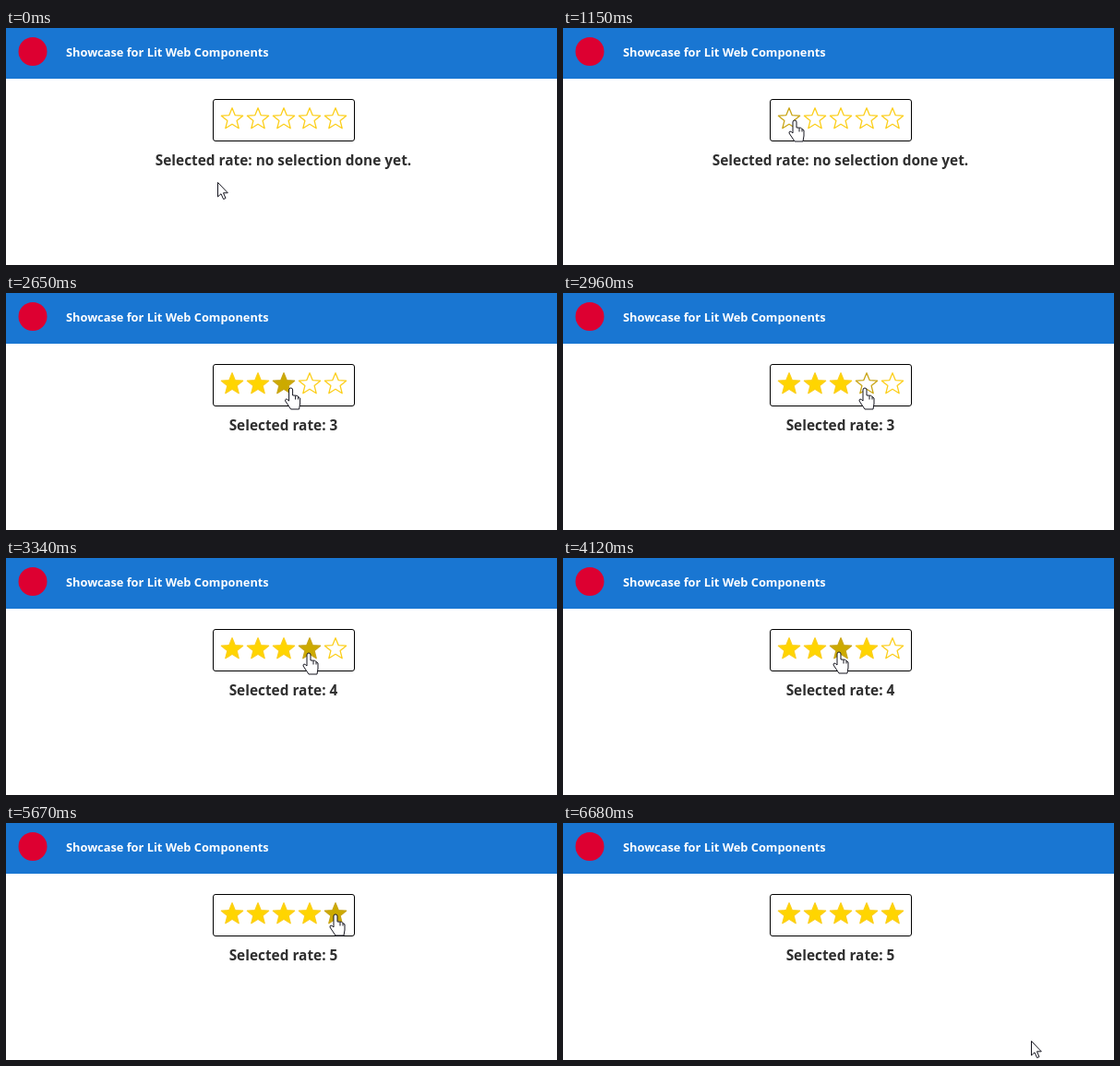
An HTML page that plays this animation: 597 px wide and 257 px high, repeating every 6.85 s.

```html
<!DOCTYPE html>
<html lang="en">
<head>
<meta charset="utf-8">
<title>Star rating</title>
<style>
  html, body { margin: 0; height: 100%; overflow: hidden; background: #fff; }
  svg { display: block; width: 597px; height: 257px; font: 700 15.4px "Open Sans", "Noto Sans", sans-serif; }
  .title { font-size: 12.8px; fill: #fff; }
  #label { fill: #2f2f2f; text-anchor: middle; }
  #stars { stroke: #fccf1c; stroke-width: 1.3; stroke-linejoin: round; }
  .hover { filter: brightness(.8); }
  #cursor { fill: #fff; stroke: #15151f; stroke-linejoin: round; }
</style>
</head>
<body>
<svg viewBox="0 0 597 257">
  <rect width="597" height="55" fill="#1976d2"/>
  <circle cx="29" cy="25.5" r="15.5" fill="#dd0031"/>
  <text class="title" x="65" y="31">Showcase for Lit Web Components</text>
  <rect x="224.5" y="77.5" width="153" height="45" rx="2.5" fill="#fff" stroke="#000"/>
  <g id="stars"></g>
  <text id="label" x="300.5" y="149"></text>
  <g id="cursor">
    <path id="arrow" d="M.5.5V16L4 12.8 6.6 18.6 9 17.6 6.5 11.8H11.3Z"/>
    <path id="hand" d="M-2 14V2a2 2 0 0 1 4 0V8q5-1 8 3v6l-1 6H0L-6 14q0-4 4 0M5 8.5v4M8 9.5v3"/>
  </g>
</svg>
<script>
const LOOP = 6850, TICK = 77, LEFT = 231, PITCH = 28;
const $ = id => document.getElementById(id);

// Straight pointer moves: start, end, x, y
const home = [229, 167];
const moves = [
  [230, 840, 251, 100],
  [1230, 1540, 298, 103],
  [1620, 1770, 304, 103],
  [2650, 2960, 327, 103],
  [3040, 3120, 380, 123],
  [3190, 3270, 328, 103],
  [3970, 4120, 299, 102],
  [4200, 4350, 272, 100],
  [4900, 5050, 335, 98],
  [5130, 5360, 357, 99],
  [6050, 6200, 365, 105],
  [6370, 6680, 507, 236]
];
const clicks = [2100, 3340, 4520, 5590];

function starPath(cx) {
  const points = [];
  for (let i = 0; i < 10; i++) {
    const r = i % 2 ? 5.4 : 12.2, a = i * Math.PI / 5;
    points.push([cx + r * Math.sin(a), 98.9 - r * Math.cos(a)]);
  }
  return `M${points.join('L')}Z`;
}

const stars = Array.from({ length: 5 }, (_, i) => {
  const star = document.createElementNS('http://www.w3.org/2000/svg', 'path');
  star.setAttribute('d', starPath(LEFT + PITCH * (i + .5)));
  return $('stars').appendChild(star);
});

// The pointer advances in whole ticks, as in a screen recording
function pointer(t) {
  let [x, y] = home;
  for (const [start, end, toX, toY] of moves) {
    if (t < start) break;
    const steps = Math.round((end - start) / TICK) + 1;
    const u = Math.min(1, Math.floor((t - start) / TICK + 1.15) / steps);
    x += (toX - x) * u;
    y += (toY - y) * u;
  }
  return [x, y];
}

function starAt([x, y]) {
  const i = Math.floor((x - LEFT) / PITCH);
  return y > 85 && y < 113 && stars[i] ? i : -1;
}

function draw(t) {
  const [x, y] = pointer(t);
  const hovered = starAt([x, y]);
  const click = clicks.filter(c => c <= t).pop();
  const rate = click ? starAt(pointer(click)) + 1 : 0;

  stars.forEach((star, i) => {
    star.setAttribute('fill', i < rate ? '#ffd500' : 'none');
    star.classList.toggle('hover', i === hovered);
  });
  $('label').textContent = `Selected rate: ${rate || 'no selection done yet.'}`;
  $('cursor').setAttribute('transform', `translate(${x} ${y})`);
  $('arrow').style.display = hovered < 0 ? '' : 'none';
  $('hand').style.display = hovered < 0 ? 'none' : '';
}

const begin = performance.now();
function tick() {
  draw((performance.now() - begin) % LOOP);
  requestAnimationFrame(tick);
}
tick();
</script>
</body>
</html>
```
